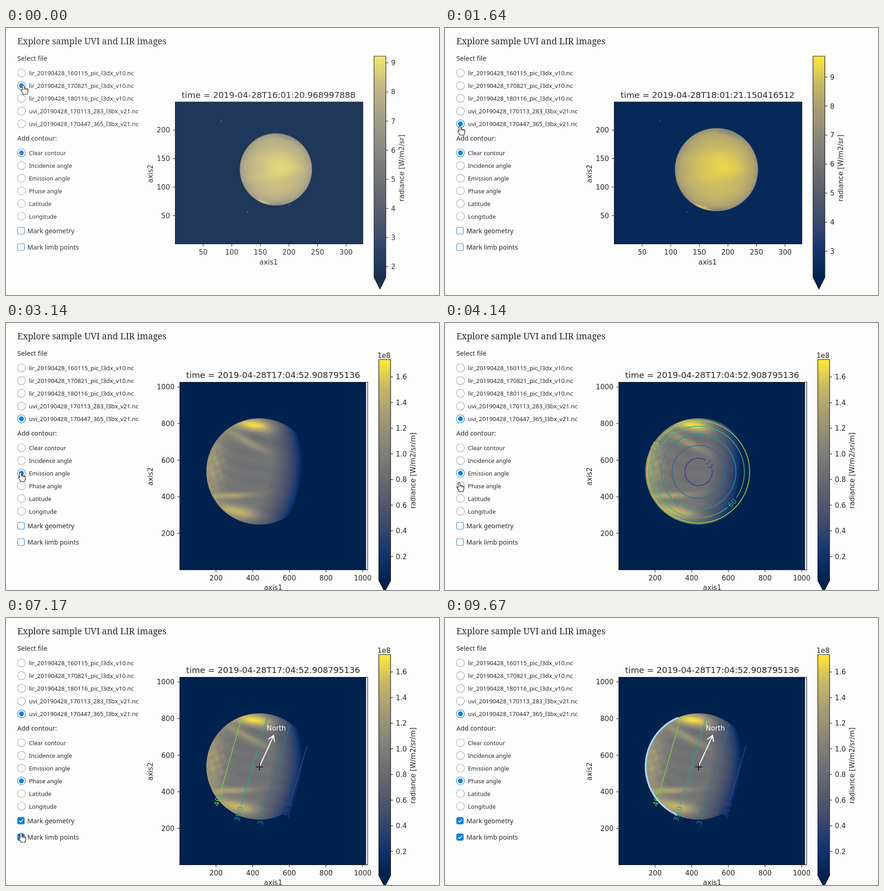
Recreate the animation shown at these times as an HTML page with a canvas. Size 953 by 588 pixels, loop 9.7 s.

```html
<!DOCTYPE html>
<html lang="en">
<head>
<meta charset="utf-8">
<title>Image explorer</title>
<style>
html, body { margin: 0; width: 100%; height: 100%; overflow: hidden; background: #fdfdfd; }
canvas { display: block; }
</style>
</head>
<body>
<canvas id="stage" width="953" height="588"></canvas>
<script>
const LOOP = 9700;
const ctx = document.getElementById('stage').getContext('2d');
const SANS = '"Noto Sans", "Open Sans", sans-serif';
const SERIF = '"Noto Serif", serif';
const PLOT = '"DejaVu Sans", sans-serif';
const BLUE = '#0f80e0';
const INK = '#25272d';

const files = [
  'lir_20190428_160115_pic_l3dx_v10.nc',
  'lir_20190428_170821_pic_l3dx_v10.nc',
  'lir_20190428_180116_pic_l3dx_v10.nc',
  'uvi_20190428_170113_283_l3bx_v21.nc',
  'uvi_20190428_170447_365_l3bx_v21.nc'
];
const contours = ['Clear contour', 'Incidence angle', 'Emission angle',
  'Phase angle', 'Latitude', 'Longitude'];

// Each track lists [start time, value] pairs.
const tracks = {
  file: [[0, 1], [620, 2], [1150, 3], [1480, 4]],
  contour: [[0, 0], [3040, 2], [4420, 3]],
  plot: [[0, 0], [520, 1], [1200, 2], [2250, 3]],
  overlay: [[0, ''], [3620, 'emission'], [4950, 'phase']],
  geometry: [[0, false], [5720, true]],
  limb: [[0, false], [7060, true]],
  arrow: [[0, false], [6400, true]],
  arc: [[0, false], [7850, true]]
};
const pointerPath = [
  [0, 38, 126], [350, 38, 126], [580, 37, 153], [850, 36, 155], [1100, 35, 182],
  [1200, 34, 184], [1450, 33, 216], [1900, 33, 216], [2500, 33, 300], [2950, 32, 329],
  [3500, 32, 329], [4100, 31, 351], [4600, 31, 353], [5200, 35, 445], [5900, 35, 446],
  [6700, 33, 474], [7300, 33, 474], [7900, -24, 490]
];

const lirAxes = {
  x: 372.5, y: 163, w: 413, h: 312.5, cx: 578, titleY: 153.5, axisX: 515.5, axisY: 321,
  xTicks: { first: 434, step: 62.9, from: 50, by: 50, count: 6 },
  yTicks: { first: 413, step: -62.7, from: 50, by: 50, count: 4 },
  bar: { x: 810, top: 62, bottom: 549, tip: 575 }, unitX: 870, unitY: 308.5,
  unit: 'radiance [W/m2/sr]', imageW: 413, sky: 0.045
};
const uviAxes = {
  x: 382.5, y: 130.5, w: 413.5, h: 413, cx: 588, titleY: 121, axisX: 582, axisY: 338,
  xTicks: { first: 462.3, step: 80.7, from: 200, by: 200, count: 5 },
  yTicks: { first: 463.3, step: -80.6, from: 200, by: 200, count: 5 },
  bar: { x: 820.5, top: 80.5, bottom: 567, tip: 592 }, unitX: 895, unitY: 325,
  unit: 'radiance [W/m2/sr/m]', imageW: 410, sky: 0
};
const plots = [
  { axes: lirAxes, time: '16:01:20.968997888', disc: [594, 311.5, 79.5], ticks: [2, 9, 1, 525.5, 64.1] },
  { axes: lirAxes, time: '17:08:26.059706880', disc: [596, 311.7, 85.5], ticks: [2, 9, 1, 540.5, 64] },
  { axes: lirAxes, time: '18:01:21.150416512', disc: [597.5, 312, 91.5], ticks: [3, 9, 1, 491.5, 63.9] },
  { axes: uviAxes, time: '17:04:52.908795136', disc: [558, 327, 117], ticks: [0.2, 1.6, 0.2, 514, 56.45] }
];

const clamp = (v, lo = 0, hi = 1) => Math.min(hi, Math.max(lo, v));
const valueAt = (track, t) => track.reduce((v, [start, next]) => t >= start ? next : v, track[0][1]);

const ramp = ['00224e', '123570', '3b496c', '575d6d', '707173', '8a8678', 'a59c74', 'c8b866', 'fee838']
  .map(h => [0, 2, 4].map(i => parseInt(h.slice(i, i + 2), 16)));

function cividis(v) {
  const p = clamp(v) * (ramp.length - 1);
  const i = Math.min(ramp.length - 2, Math.floor(p));
  return ramp[i].map((c, k) => Math.round(c + (ramp[i + 1][k] - c) * (p - i)));
}
const css = v => `rgb(${cividis(v)})`;

function blob(x, y, cx, cy, sx, sy, angle = 0) {
  const c = Math.cos(angle), s = Math.sin(angle);
  const u = ((x - cx) * c + (y - cy) * s) / sx;
  const v = ((y - cy) * c - (x - cx) * s) / sy;
  return Math.exp(-u * u - v * v);
}

function thermal(x, y) {
  const z = Math.sqrt(Math.max(0, 1 - x * x - y * y));
  const streak = 0.007 * Math.sin(y * 13 + x * 2);
  return 0.58 + 0.33 * Math.pow(z, 0.65) + streak
    + 0.05 * blob(x, y, 0.25, -0.12, 0.5, 0.25)
    + 0.22 * blob(x, y, -0.35, 0.91, 0.24, 0.04, 0.35)
    - 0.1 * blob(x, y, 0.05, 0.98, 0.3, 0.07)
    - 0.1 * blob(x, y, 0.3, -0.88, 0.3, 0.06, 0.3);
}

function ultraviolet(x, y) {
  // The poles stay bright up to the limb, so y counts less towards the shading.
  const depth = Math.sqrt(Math.max(0, 1 - x * x - 0.55 * y * y));
  const sun = clamp(0.79 * depth - 0.595 * x - 0.1 * y);
  const light = Math.pow(Math.min(1, sun / 0.65), 0.8);
  const streak = 0.012 * Math.sin(y * 24 - x * 7 + Math.sin(x * 5));
  const mottle = 0.05 * Math.sin(x * 31 + y * 13) * Math.sin(y * 27 - x * 11) * blob(x, y, -0.8, -0.08, 0.2, 0.35);
  const limb = 0.1 * Math.pow(clamp(-x), 3) + 0.06 * Math.pow(Math.hypot(x, y), 6);
  const bands = 0.46 * blob(x, y, -0.1, -0.87, 0.4, 0.11, 0.13)
    + 0.2 * blob(x, y, -0.26, -0.58, 0.48, 0.07, 0.5)
    - 0.04 * blob(x, y, -0.15, -0.7, 0.4, 0.05, 0.35)
    + 0.13 * blob(x, y, -0.85, -0.1, 0.18, 0.45)
    + 0.25 * blob(x, y, -0.5, 0.45, 0.45, 0.06, -0.04)
    + 0.32 * blob(x, y, -0.4, 0.75, 0.4, 0.12, 0.2);
  return (0.5 + limb + bands + streak + mottle) * light;
}

function makeDisc(radius, shade) {
  const half = Math.ceil(radius) + 1, size = half * 2;
  const canvas = document.createElement('canvas');
  canvas.width = canvas.height = size;
  const g = canvas.getContext('2d');
  const image = g.createImageData(size, size);
  for (let j = 0; j < size; j++) for (let i = 0; i < size; i++) {
    const x = (i + 0.5 - half) / radius, y = (j + 0.5 - half) / radius;
    const alpha = clamp((1 - Math.hypot(x, y)) * radius + 0.5);
    if (alpha) image.data.set([...cividis(shade(x, y)), alpha * 255], (j * size + i) * 4);
  }
  g.putImageData(image, 0, 0);
  return canvas;
}
for (const p of plots) p.image = makeDisc(p.disc[2], p.axes === uviAxes ? ultraviolet : thermal);

function text(str, x, y, size, font, color = INK, align = 'left') {
  ctx.font = `${size}px ${font}`;
  ctx.fillStyle = color;
  ctx.textAlign = align;
  ctx.fillText(str, x, y);
}

// Plot text, centred vertically on y.
function label(str, x, y, align = 'center', color = '#262626', angle = 0, size = 15.3) {
  ctx.save();
  ctx.translate(x, y);
  ctx.rotate(angle);
  text(str, 0, size * 0.365, size, PLOT, color, align);
  ctx.restore();
}

function line(color, width, ...points) {
  ctx.strokeStyle = color;
  ctx.lineWidth = width;
  ctx.beginPath();
  points.forEach(([x, y], i) => i ? ctx.lineTo(x, y) : ctx.moveTo(x, y));
  ctx.stroke();
}

function circle(x, y, r) {
  ctx.beginPath();
  ctx.arc(x, y, r, 0, Math.PI * 2);
}

function radio(x, y, on) {
  circle(x, y, 8.8);
  ctx.fillStyle = '#fff';
  ctx.fill();
  ctx.strokeStyle = on ? '#3187d0' : '#a9a9b0';
  ctx.lineWidth = 1.2;
  ctx.stroke();
  if (!on) return;
  circle(x, y, 5.4);
  ctx.fillStyle = BLUE;
  ctx.fill();
}

function checkbox(y, str, on) {
  ctx.beginPath();
  ctx.roundRect(25.5, y - 7.5, 15, 15, 3.5);
  ctx.fillStyle = on ? BLUE : '#fff';
  ctx.fill();
  ctx.strokeStyle = '#2f82c4';
  ctx.lineWidth = 1.2;
  ctx.stroke();
  if (on) line('#fff', 1.7, [29, y], [32, y + 3], [37.5, y - 3]);
  text(str, 47, y + 5.5, 14.3, SANS);
}

function sidebar(s) {
  text('Explore sample UVI and LIR images', 25, 36, 19.3, SERIF);
  text('Select file', 25, 72, 14.8, SANS);
  files.forEach((name, i) => {
    const y = 99 + i * 28;
    radio(34, y, i === s.file);
    text(name, 50.5, y + 5, 13.2, SANS);
  });
  text('Add contour:', 25, 248, 14.3, SANS);
  contours.forEach((name, i) => {
    const y = 274.8 + i * 27.95;
    radio(34, y, i === s.contour);
    text(name, 50.5, y + 5, 12.8, SANS);
  });
  checkbox(446.5, 'Mark geometry', s.geometry);
  checkbox(482.5, 'Mark limb points', s.limb);
}

function colorbar(a, [from, to, by, first, step]) {
  const { x, top, bottom, tip } = a.bar, right = x + 26;
  const fill = ctx.createLinearGradient(0, top, 0, bottom);
  for (let i = 0; i <= 16; i++) fill.addColorStop(i / 16, css(1 - i / 16));
  ctx.beginPath();
  [[x, top], [right, top], [right, bottom], [x + 13, tip], [x, bottom]].forEach(p => ctx.lineTo(...p));
  ctx.closePath();
  ctx.fillStyle = fill;
  ctx.fill();
  ctx.strokeStyle = '#111';
  ctx.lineWidth = 1.2;
  ctx.stroke();
  const uvi = a === uviAxes, count = Math.round((to - from) / by);
  for (let i = 0; i <= count; i++) {
    const y = first - i * step;
    line('#222', 1.2, [right, y], [right + 5.5, y]);
    label((from + i * by).toFixed(uvi ? 1 : 0), right + 11.5, y, 'left');
  }
  if (uvi) label('1e8', 832, 71);
  label(a.unit, a.unitX, a.unitY, 'center', '#262626', -Math.PI / 2);
}

function drawPlot(p) {
  const a = p.axes, [cx, cy] = p.disc, bottom = a.y + a.h;
  ctx.fillStyle = '#fff';
  ctx.fillRect(a.x, a.y, a.w, a.h);
  ctx.fillStyle = css(a.sky);
  ctx.fillRect(a.x, a.y, a.imageW, a.h);
  ctx.drawImage(p.image, cx - p.image.width / 2, cy - p.image.height / 2);
  if (a === lirAxes) {
    ctx.fillStyle = '#c9c58f';
    for (const [x, y] of [[473, 204], [531, 405], [623, 389]]) ctx.fillRect(x, y, 1.4, 1.4);
  }
  ctx.strokeStyle = '#111';
  ctx.lineWidth = 1.2;
  ctx.strokeRect(a.x, a.y, a.w, a.h);
  for (let i = 0; i < a.xTicks.count; i++) {
    const x = a.xTicks.first + i * a.xTicks.step;
    line('#222', 1.2, [x, bottom], [x, bottom + 5.5]);
    label(a.xTicks.from + i * a.xTicks.by, x, bottom + 17.5);
  }
  for (let i = 0; i < a.yTicks.count; i++) {
    const y = a.yTicks.first + i * a.yTicks.step;
    line('#222', 1.2, [a.x - 5.5, y], [a.x, y]);
    label(a.yTicks.from + i * a.yTicks.by, a.x - 11.5, y, 'right');
  }
  label('axis1', a.cx, a.axisX);
  label('axis2', 317.5, a.axisY, 'center', '#262626', -Math.PI / 2);
  text('time = 2019-04-28T' + p.time, a.cx, a.titleY, 18.5, PLOT, '#262626', 'center');
  colorbar(a, p.ticks);
}

function emissionContours(cx, cy, radius) {
  // angle, colour, label position on the ring, half gap
  const rings = [
    [15, '#443983', -0.6, 0.42], [30, '#31688e', 0, 0], [45, '#21918c', 2.19, 0.18],
    [60, '#35b779', 0.743, 0.14], [75, '#90d743', -2.6, 0.12]
  ];
  for (const [deg, color, at, gap] of rings) {
    const r = radius * Math.sin(deg * Math.PI / 180);
    ctx.beginPath();
    ctx.arc(cx, cy, r, at + gap, at - gap + Math.PI * 2);
    ctx.strokeStyle = color;
    ctx.lineWidth = 1.7;
    ctx.stroke();
    if (gap) label(deg, cx + r * Math.cos(at), cy + r * Math.sin(at), 'center', color,
      at + (at > 0 ? -1 : 1) * Math.PI / 2);
  }
}

function phaseContours() {
  const lines = [
    ['40.5', '#7ad151', 518, 222, 473, 381, 467, 397],
    ['39.0', '#22a884', 575, 218, 518, 411, 512, 431],
    ['37.5', '#2a788e', 625, 234, 570, 420, 563, 439],
    ['36.0', '#414487', 663, 280, 627, 402, 621, 422]
  ];
  for (const [name, color, x1, y1, x2, y2, lx, ly] of lines) {
    line(color, 1.5, [x1, y1], [x2, y2]);
    label(name, lx, ly, 'center', color, -1.29);
  }
}

function northArrow(x, y) {
  line('#fff', 2.2, [x, y], [589, 259]);
  line('#fff', 2.2, [577.5, 267], [589, 258.5], [591, 272.5]);
  line('#111', 1.7, [x - 7.5, y + 1], [x + 7.5, y + 1]);
  line('#111', 1.7, [x, y - 6.5], [x, y + 8.5]);
  label('North', 595, 242.5, 'center', '#fff', 0, 15);
}

function limbArc(x, y, r) {
  ctx.beginPath();
  ctx.arc(x, y, r - 0.5, Math.atan2(109, -48), Math.atan2(-107, -45));
  ctx.strokeStyle = '#a9d6f6';
  ctx.lineWidth = 3.8;
  ctx.stroke();
}

function pointer(t) {
  const next = pointerPath.findIndex(k => k[0] > t);
  if (next < 0) return;
  const [t0, x0, y0] = pointerPath[next - 1], [t1, x1, y1] = pointerPath[next];
  const u = (t - t0) / (t1 - t0), e = u * u * (3 - 2 * u);
  ctx.save();
  ctx.translate(x0 + (x1 - x0) * e, y0 + (y1 - y0) * e);
  const hand = new Path2D('M-2 1.5Q0 -1.5 2 1.5V7Q4 5.6 5.4 7.6Q7.4 6.6 8.4 8.6Q10.6 8 10.6 10.5V14Q10 16 9 18V20H-.5V18L-5 11.6Q-4.6 8.6-2 11.2Z');
  ctx.fillStyle = '#fff';
  ctx.fill(hand);
  ctx.strokeStyle = '#1a1a1a';
  ctx.lineWidth = 1.2;
  ctx.stroke(hand);
  line('#1a1a1a', 1, [2, 7], [2, 10.5]);
  line('#1a1a1a', 1, [5.4, 7.6], [5.4, 11]);
  line('#1a1a1a', 1, [8.4, 8.6], [8.4, 11.5]);
  ctx.restore();
}

function cover(color, alpha, mode = 'source-over') {
  ctx.save();
  ctx.globalCompositeOperation = mode;
  ctx.globalAlpha = alpha;
  ctx.fillStyle = color;
  ctx.fillRect(0, 0, 953, 588);
  ctx.restore();
}

function draw(t) {
  const s = {};
  for (const key in tracks) s[key] = valueAt(tracks[key], t);
  const plot = plots[s.plot];
  cover('#fdfdfd', 1);
  sidebar(s);
  drawPlot(plot);
  if (s.overlay === 'emission') emissionContours(558, 328, 116.5);
  if (s.overlay === 'phase') phaseContours();
  if (s.arc) limbArc(...plot.disc);
  if (s.arrow) northArrow(558, 327);
  pointer(t);
  // The picture opens with muted colours.
  const muted = clamp((240 - t) / 200);
  if (muted) {
    cover('#808080', 0.28 * muted, 'saturation');
    cover('#fdfdfd', 0.07 * muted);
  }
}

const begin = performance.now();
function tick() {
  draw((performance.now() - begin) % LOOP);
  requestAnimationFrame(tick);
}
tick();
</script>
</body>
</html>
```
